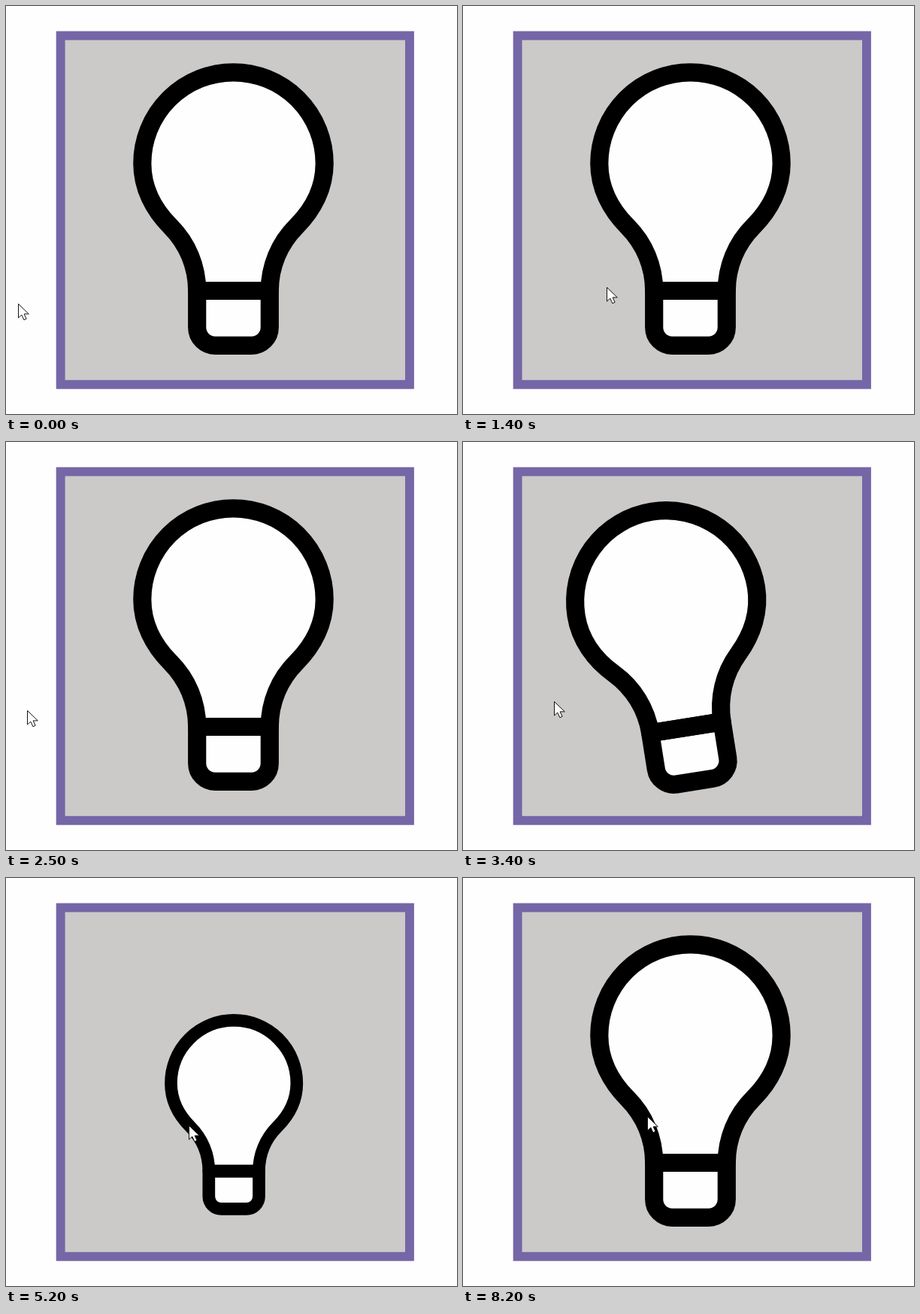
Write an HTML page with a canvas that moves like this. It is 600 by 543 pixels and loops after 9.8 s.

```html
<!DOCTYPE html>
<html lang="en">
<head>
<meta charset="utf-8">
<title>Light bulb</title>
<style>
  html, body { margin: 0; width: 100%; height: 100%; overflow: hidden; background: #fefefe; }
  canvas { display: block; }
</style>
</head>
<body>
<canvas id="stage" width="600" height="543"></canvas>
<script>
const ctx = document.getElementById('stage').getContext('2d');
const LOOP = 9800, STEP = 100;
const PIVOT = { x: 304.6, y: 415 };
const CX = 302.5, CY = 209.5, RADIUS = 121.2, LINE = 24.2;
const NECK = 48.3, BASE_TOP = 379;

const SHAKE_EVERY = 560, SHAKE_MS = 390, SHAKE_TILT = Math.PI / 12;
const CLICK = 5100, LIGHT_ON = 5300, LIGHT_OFF = 8200;

const WHITE = '#fefefe', YELLOW = '#fbf06b';

// Progress from 0 to 1 between two times, eased at both ends
function ease(t, start, end) {
  const p = Math.min(1, Math.max(0, (t - start) / (end - start)));
  return p * p * (3 - 2 * p);
}

function cursorAt(t) {
  const visit = ease(t, 700, 1400), leave = ease(t, 1900, 2500);
  const press = ease(t, 2900, 4000);
  const away = ease(t, 6500, 7100), back = ease(t, 7400, 8100);
  return {
    x: 17 + 175 * visit - 163 * leave + 215 * press - 222 * away + 224 * back,
    y: 397 - 22 * visit - 17 * leave - 28 * press + 2 * away - 14 * back
  };
}

// A run of equal shakes, one after the other
function shakeRun(t, start, count) {
  const elapsed = t - start;
  if (elapsed < 0 || elapsed >= count * SHAKE_EVERY) return 0;
  const p = elapsed % SHAKE_EVERY / SHAKE_MS;
  return p < 1 ? SHAKE_TILT * Math.sin(p * Math.PI * 2) : 0;
}

const tiltAt = t => shakeRun(t, 980, 2) + shakeRun(t, 3050, 3);

function scaleAt(t) {
  const p = (t - CLICK) / 600;
  return p > 0 && p < 1 ? 1 - 0.323 * Math.sin(Math.PI * Math.sqrt(p)) : 1;
}

// Two 45 degree arcs on each side join the round top to the neck
function makeGlass() {
  const path = new Path2D();
  const handle = RADIUS * 0.265, slant = handle * Math.SQRT1_2;
  const joinX = 83.7, joinY = 293.4;
  path.moveTo(CX - NECK, BASE_TOP);
  path.bezierCurveTo(CX - NECK, BASE_TOP - handle,
    CX - joinX + slant, joinY + slant, CX - joinX, joinY);
  path.bezierCurveTo(CX - joinX - slant, joinY - slant,
    CX - RADIUS, CY + handle, CX - RADIUS, CY);
  path.arc(CX, CY, RADIUS, Math.PI, 0);
  path.bezierCurveTo(CX + RADIUS, CY + handle,
    CX + joinX + slant, joinY - slant, CX + joinX, joinY);
  path.bezierCurveTo(CX + joinX - slant, joinY + slant,
    CX + NECK, BASE_TOP - handle, CX + NECK, BASE_TOP);
  path.closePath();
  return path;
}

function makeBase() {
  const path = new Path2D();
  path.roundRect(CX - NECK, BASE_TOP, NECK * 2, 72.8, [0, 0, 24, 24]);
  return path;
}

const glass = makeGlass(), base = makeBase();
const arrow = new Path2D('M0 0V18.5L4.3 14.6L7.4 21.3L10.6 19.8L7.6 13.4H13.8Z');

function drawFrame() {
  ctx.fillStyle = WHITE;
  ctx.fillRect(0, 0, 600, 543);
  ctx.fillStyle = '#7566a7';
  ctx.fillRect(66.7, 33.5, 476.2, 476.2);
  ctx.fillStyle = '#cbcac9';
  ctx.fillRect(78.6, 45.4, 452.4, 452.4);
}

function drawRays(t) {
  const p = (t - 5400) / 600;
  if (p <= 0 || p >= 1) return;
  const outer = 150 + 64 * ease(p, 0, 0.6);
  const inner = outer - 45 * (1 - p);
  ctx.save();
  ctx.translate(304.5, 269.5);
  ctx.lineWidth = 10;
  ctx.lineCap = 'round';
  ctx.strokeStyle = YELLOW;
  ctx.beginPath();
  for (let i = 0; i < 5; i++) {
    const a = Math.PI * (1 + i / 4);
    ctx.moveTo(Math.cos(a) * inner, Math.sin(a) * inner);
    ctx.lineTo(Math.cos(a) * outer, Math.sin(a) * outer);
  }
  ctx.stroke();
  ctx.restore();
}

function drawBulb(t) {
  const lit = t >= LIGHT_ON && t < LIGHT_OFF;
  const scale = scaleAt(t);
  ctx.save();
  ctx.translate(PIVOT.x, PIVOT.y);
  ctx.rotate(tiltAt(t));
  ctx.scale(scale, scale);
  ctx.translate(-PIVOT.x, -PIVOT.y);
  ctx.lineWidth = LINE;
  ctx.lineJoin = 'round';
  ctx.strokeStyle = '#000';
  ctx.fillStyle = lit ? YELLOW : WHITE;
  ctx.fill(glass);
  ctx.fillStyle = lit ? '#cfcfcf' : WHITE;
  ctx.fill(base);
  ctx.stroke(glass);
  ctx.stroke(base);
  ctx.restore();
}

function drawCursor(t) {
  const { x, y } = cursorAt(t);
  ctx.save();
  ctx.translate(Math.round(x) - 0.5, Math.round(y) - 0.5);
  ctx.fillStyle = '#fff';
  ctx.fill(arrow);
  ctx.lineWidth = 1;
  ctx.strokeStyle = '#111';
  ctx.stroke(arrow);
  ctx.restore();
}

function render() {
  const t = Math.floor(performance.now() % LOOP / STEP) * STEP;
  drawFrame();
  drawRays(t);
  drawBulb(t);
  drawCursor(t);
  requestAnimationFrame(render);
}
render();
</script>
</body>
</html>
```
